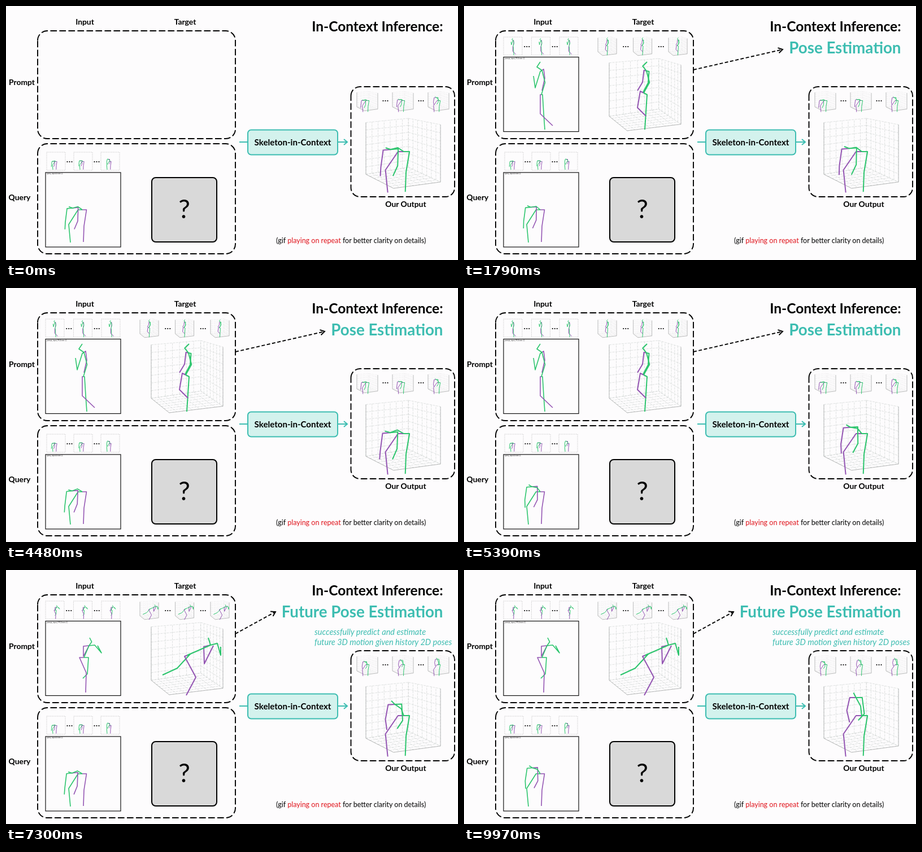
An HTML page that plays this animation: 800 by 450 pixels, repeating every 10 s.

```html
<!DOCTYPE html>
<html lang="en">
<head>
<meta charset="utf-8">
<title>In-Context Inference</title>
<style>
  html, body { margin: 0; width: 100%; height: 100%; overflow: hidden; background: #fdfcfd; }
  svg { display: block; width: 800px; height: 450px; font-family: Carlito, Lato, sans-serif; }
  path { fill: none; vector-effect: non-scaling-stroke; }
  .b { font-weight: 700; }
  .label { font-weight: 700; font-size: 13.9px; text-anchor: middle; }
  .dash { stroke: #000; stroke-width: 1.9; stroke-dasharray: 11.6 4.4; }
  .frame { fill: none; stroke: #111; stroke-width: 1.2; }
  .mini { fill: none; stroke: #c4c4c4; stroke-width: .7; stroke-dasharray: 2 1; }
  .teal { fill: #3dbdb1; }
  .tiny { font-size: 3px; fill: #333; }
  .tag { font-size: 14.5px; font-style: italic; }
  .head { font-size: 27.7px; font-weight: 700; text-anchor: end; }
  .arrow { stroke: #000; stroke-width: 1.9; }
  .grid { stroke: #d3d7d6; stroke-width: .7; stroke-dasharray: 4 1.5; }
  .edge { stroke: #a2a4a4; stroke-width: .7; }
  .bone { stroke-width: 2; stroke-linejoin: round; }
  .flat .bone { stroke-width: 1.6; }
  .thumb .bone { stroke-width: 1; }
  .thumb .grid { stroke-width: .2; }
  .green { stroke: #2cc56d; }
  .purple { stroke: #9455b3; }
</style>
</head>
<body>
<svg id="stage" viewBox="0 0 800 450">
  <rect width="800" height="450" fill="#fdfcfd"/>
  <text class="label" x="139.5" y="33">Input</text>
  <text class="label" x="317" y="33">Target</text>
  <text class="label" x="28" y="140">Prompt</text>
  <text class="label" x="24" y="344">Query</text>
  <text class="label" x="707.5" y="356">Our Output</text>
  <text class="b" x="773.5" y="45" text-anchor="end" font-size="24.5">In-Context Inference:</text>
  <text x="478" y="420" font-size="12.5">(gif <tspan fill="#e0141c">playing on repeat</tspan> for better clarity on details)</text>

  <g stroke="#3dbdb1" stroke-width="2">
    <path d="M413 241H428M587 241H604M598 236L604 241L598 246"/>
    <rect x="428" y="219.500" width="159" height="44" rx="6" fill="#d3f2ed"/>
  </g>
  <text class="b" x="507.500" y="247" text-anchor="middle" font-size="15.1">Skeleton-in-Context</text>

  <rect class="frame" x="70" y="295" width="133" height="132"/>
  <text class="tiny" x="72" y="298">query_input (frame 2)</text>
  <rect x="258" y="304" width="115" height="114" rx="7" fill="#d9d9d9" stroke="#000" stroke-width="2"/>
  <text x="315.500" y="376" text-anchor="middle" font-size="46">?</text>
</svg>
<script>
const LOOP = 10000, CUT = 5470, CYCLE = 1600, BLIND = 500;
const stage = document.getElementById('stage');

// Shoulders and hips sit at plus and minus one offset; neck and back bow sideways;
// each limb is a middle joint and an end.
const bent = {
  head: [-25, -3], neck: 0, chest: [-18, -1], back: .25, hips: [0, 0],
  shoulder: [-10, 1], hip: [-7.5, 0],
  arms: [[[-31, 25], [-32, 37]], [[-9, 22], [-15, 37]]],
  legs: [[[-24, 26], [-21, 58]], [[3, 29], [2, 57]]]
};
const upright = {
  ...bent, head: [-10, -34], chest: [-7, -27], back: .08, shoulder: [-8, 0],
  arms: [[[-19, -9], [-15, 8]], [[4, -4], [-4, 5]]]
};
const walker = {
  head: [135, 99], neck: -.5, chest: [138, 114], back: .14, hips: [137, 157],
  shoulder: [-3, 2], hip: [2, 0],
  arms: [[[126, 145], [123, 124]], [[143, 128], [138, 150]]],
  legs: [[[141, 190], [143, 219]], [[135, 191], [157, 212]]]
};
const walkerDeep = {
  head: [324, 99], neck: -.45, chest: [323, 115], back: .2, hips: [318, 154],
  shoulder: [4.5, 1], hip: [6, 3],
  arms: [[[326, 136], [317, 153]], [[316, 135], [307, 150]]],
  legs: [[[322, 188], [320, 219]], [[307, 180], [322, 195]]]
};
const leaner = {
  head: [148, 120], neck: .3, chest: [147, 134], back: 0, hips: [138, 155],
  shoulder: [10, -1], hip: [8, 0],
  arms: [[[169, 147], [162, 134]], [[137, 153], [147, 134]]],
  legs: [[[144, 184], [136, 192]], [[142, 182], [141, 217]]]
};
const leanerDeep = {
  head: [358, 120], neck: 0, chest: [362, 133], back: 0, hips: [321, 151],
  shoulder: [12, -3], hip: [5, -2],
  arms: [[[380, 151], [380, 136]], [[351, 166], [367, 134]]],
  legs: [[[303, 174], [277, 186]], [[336, 190], [319, 222]]]
};

const clamp = v => Math.min(1, Math.max(0, v));
const mix = (a, b, k) => a + (b - a) * k;
const mixPt = (a, b, k) => [mix(a[0], b[0], k), mix(a[1], b[1], k)];
const offset = (p, d, s) => [p[0] + d[0] * s, p[1] + d[1] * s];
const line = pts => 'M' + pts.map(p => p[0].toFixed(2) + ' ' + p[1].toFixed(2)).join('L');

function blend(a, b, k) {
  if (typeof a === 'number') return mix(a, b, k);
  if (Array.isArray(a)) return a.map((v, i) => blend(v, b[i], k));
  return Object.fromEntries(Object.keys(a).map(n => [n, blend(a[n], b[n], k)]));
}

// The query straightens up slowly; the forecast carries on to standing.
const IN_PLACE = 'translate(135 361)', OUT_PLACE = 'translate(704 258) scale(1.35 1.25)';
const rise = p => blend(bent, upright, .55 * p * p);
const stand = p => blend(bent, upright, clamp(.5 + .55 * p));
const query = { pose: rise, place: IN_PLACE };
const present = { pose: rise, place: OUT_PLACE, swap: true };
const future = { pose: stand, place: OUT_PLACE, swap: true };
const still = figure => ({ pose: () => figure });

const scenes = [
  { title: 'Pose Estimation', code: 'PE', start: 200, tip: [564, 77],
    input: still(walker), target: still(walkerDeep), output: present },
  { title: 'Future Pose Estimation', code: 'FPE', start: 6260, tip: [477, 74],
    input: still(leaner), target: still(leanerDeep), output: future,
    notes: ['successfully predict and estimate', 'future 3D motion given history 2D poses'] }
];
const targetRoom = [257, 93, 127, 128, .69];
const outRoom = [637, 199, 132, 124, .57];

function add(parent, tag, attrs = {}, text) {
  const el = document.createElementNS('http://www.w3.org/2000/svg', tag);
  for (const k in attrs) el.setAttribute(k, attrs[k]);
  if (text) el.textContent = text;
  parent.appendChild(el);
  return el;
}

function bow(a, b, k) {
  const [x, y] = mixPt(a, b, .5);
  return [x - (b[1] - a[1]) * k, y + (b[0] - a[0]) * k];
}

function bones(f) {
  const side = (i, s) =>
    line([f.chest, offset(f.chest, f.shoulder, s), ...f.arms[i]]) +
    line([f.hips, offset(f.hips, f.hip, s), ...f.legs[i]]);
  const trunk = line([f.head, bow(f.chest, f.head, f.neck), f.chest, bow(f.hips, f.chest, f.back), f.hips]);
  return [side(0, 1), side(1, -1), trunk];
}

function skeleton(parent, { pose, place = '', swap }, phase = 0) {
  const g = add(parent, 'g', { transform: place });
  const colors = swap ? ['purple', 'green', 'green'] : ['green', 'purple', 'green'];
  const paths = colors.map(c => add(g, 'path', { class: 'bone ' + c }));
  const set = p => bones(pose(p)).forEach((d, i) => paths[i].setAttribute('d', d));
  set(phase);
  return set;
}

// Two walls and a floor, with the back corner at a fraction of the width.
function room(parent, [x, y, w, h, back]) {
  const at = (u, v) => [x + u * w, y + v * h];
  const tl = at(0, .06), l = at(0, .8), tb = at(back, 0), b = at(back, .7);
  const tr = at(1, .09), r = at(1, .91), f = at(.94 - back, 1);
  let d = '';
  for (const [p, q, s, u] of [[l, b, tb, tl], [b, r, tr, tb], [l, b, r, f]]) {
    for (let i = 0; i <= 7; i++) {
      const k = i / 7;
      d += line([mixPt(p, q, k), mixPt(u, s, k)]) + line([mixPt(p, u, k), mixPt(q, s, k)]);
    }
  }
  add(parent, 'path', { class: 'grid', d });
  add(parent, 'path', { class: 'edge', d: line([tl, l, f, r, tr]) });
}

// Three small copies of a plot with dots between them.
function thumbs(parent, actor, x0, y, gap, origin, scale, plot) {
  for (let i = 0; i < 3; i++) {
    const x = x0 + i * gap;
    if (!plot) add(parent, 'rect', { class: 'mini', x, y, width: 33, height: 32 });
    const g = add(parent, 'g', {
      class: 'thumb',
      transform: `translate(${x} ${y}) scale(${scale}) translate(${-origin[0]} ${-origin[1]})`
    });
    if (plot) room(g, plot);
    skeleton(g, actor, i / 2);
    if (i) {
      const mid = x - (gap - (plot ? 38 : 33)) / 2;
      for (const dx of [-4, 0, 4]) add(parent, 'circle', { cx: mid + dx, cy: y + 17, r: 1.1 });
    }
  }
}

// A group revealed by six horizontal blinds.
let clips = 0;
function blinds(parent, y, height) {
  const id = 'blind' + clips++;
  const path = add(add(parent, 'clipPath', { id }), 'path');
  const g = add(parent, 'g', { 'clip-path': `url(#${id})` });
  const step = height / 6;
  const open = k => {
    let d = '';
    for (let i = 0; i < 6; i++) d += `M0 ${y + i * step}h800v${step * k}h-800z`;
    path.setAttribute('d', k < 1 ? d : 'M0 0H800V450H0Z');
  };
  return { g, open };
}

function dashedBox(x, y, w, h, r) {
  const arc = (dx, dy) => `a${r} ${r} 0 0 1 ${dx} ${dy}`;
  const sw = w - 2 * r, sh = h - 2 * r;
  add(stage, 'path', {
    class: 'dash',
    d: `M${x} ${y + r}${arc(r, -r)}h${sw}${arc(r, r)}v${sh}${arc(-r, r)}h${-sw}${arc(-r, -r)}z`
  });
}

function arrow(parent, tip) {
  const a = Math.atan2(tip[1] - 113, tip[0] - 406);
  const wing = s => [tip[0] - 9 * Math.cos(a + s), tip[1] - 9 * Math.sin(a + s)];
  add(parent, 'path', { class: 'arrow', d: line([[406, 113], tip]), 'stroke-dasharray': '6 3.5' });
  add(parent, 'path', { class: 'arrow', d: line([wing(.55), tip, wing(-.55)]) });
}

dashedBox(56, 44, 350, 191, 17);
dashedBox(56, 244, 350, 195, 17);
dashedBox(610.5, 143, 183.5, 195, 16);
thumbs(stage, query, 72, 259, 48, [70, 295], .25);
const moveQuery = skeleton(add(stage, 'g', { class: 'flat' }), query);

const views = scenes.map(s => {
  const root = add(stage, 'g');
  thumbs(root, s.output, 621, 151, 63, [637, 199], .28, outRoom);
  room(root, outRoom);
  const moveOutput = skeleton(root, s.output);
  (s.notes || []).forEach((n, i) => add(root, 'text', { class: 'tag teal', x: 546, y: 115 + 18 * i }, n));

  const prompt = add(root, 'g'), shades = [];
  const shade = (y, h) => {
    const b = blinds(prompt, y, h);
    shades.push(b);
    return b.g;
  };
  add(shade(49.2, 57.8), 'text', { class: 'head teal', x: 773.5, y: 84 }, s.title);
  arrow(shade(73, 40), s.tip);
  thumbs(shade(54, 34), s.input, 70, 55, 49.5, [70, 90], .25);
  thumbs(shade(54, 34), s.target, 236, 55, 62.5, [253, 95], .26, targetRoom);
  const flat = shade(89.4, 134), deep = shade(68, 173);
  flat.classList.add('flat');
  add(flat, 'rect', { class: 'frame', x: 70, y: 90.5, width: 133, height: 132 });
  add(flat, 'text', { class: 'tiny', x: 72, y: 94 }, `prompt_input_${s.code} (frame 2)`);
  skeleton(flat, s.input);
  room(deep, targetRoom);
  skeleton(deep, s.target);
  return { root, prompt, shades, moveOutput, start: s.start };
});

function draw(t) {
  const now = t < CUT ? 0 : 1;
  const phase = (now ? t - CUT : t + 600) % CYCLE / CYCLE;
  const view = views[now];
  const k = clamp((t - view.start) / BLIND);
  views.forEach(v => { v.root.style.display = v === view ? '' : 'none'; });
  view.prompt.style.display = k > 0 ? '' : 'none';
  view.shades.forEach(s => s.open(k));
  view.moveOutput(phase);
  moveQuery(phase);
}

const t0 = performance.now();
function tick() {
  draw((performance.now() - t0) % LOOP);
  requestAnimationFrame(tick);
}
tick();
</script>
</body>
</html>
```
